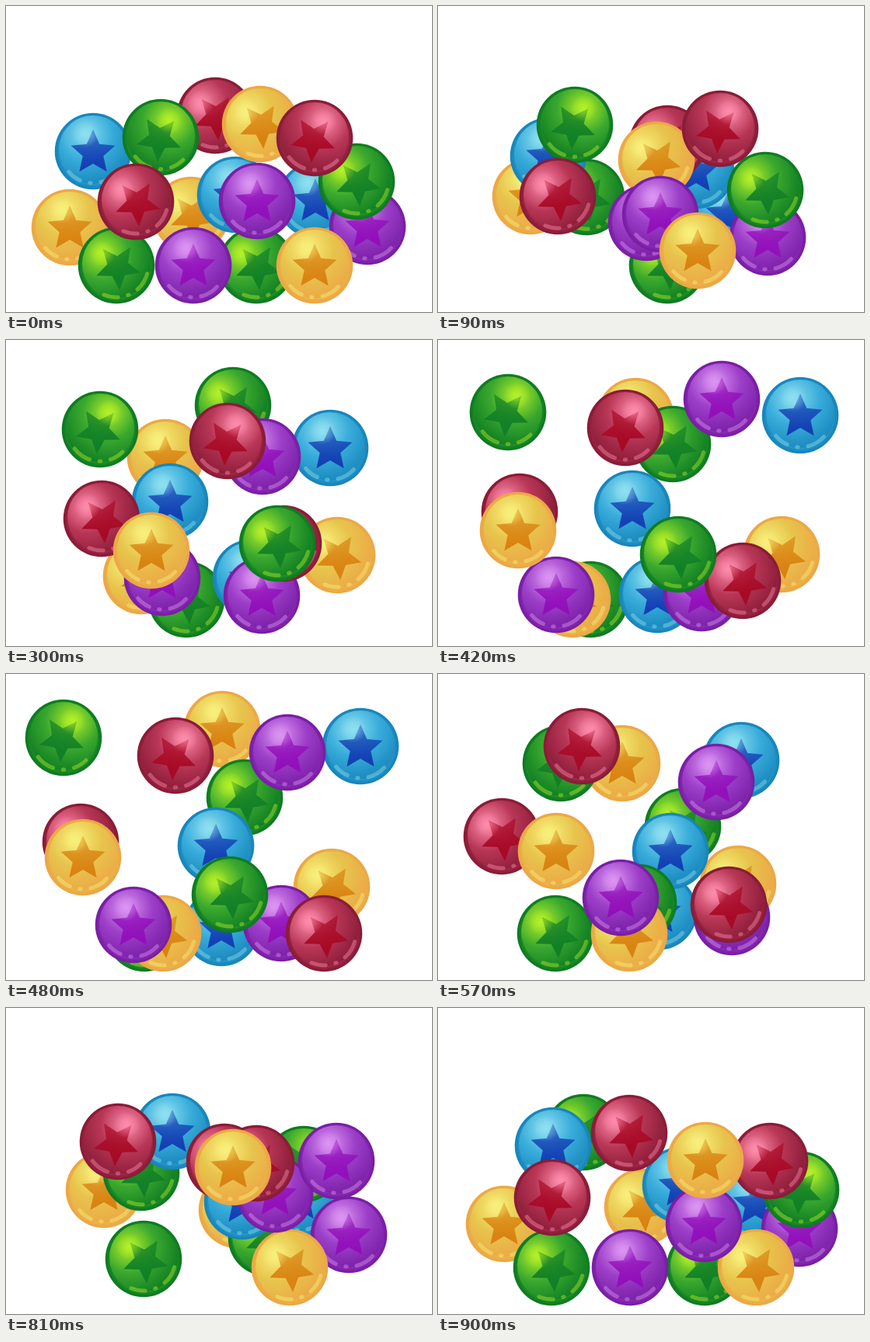
Animation, 548 px wide and 394 px high, one loop 930 ms. Source, as an HTML page with a canvas:

```html
<!DOCTYPE html>
<html lang="en">
<head>
<meta charset="utf-8">
<title>Star balls</title>
<style>
html, body { margin: 0; width: 100%; height: 100%; overflow: hidden; background: #fff; }
canvas { display: block; }
</style>
</head>
<body>
<canvas id="stage" width="548" height="394"></canvas>
<script>
const BEAT = 30, BEATS = 31, LAST = BEATS - 1;
const RADIUS = 49.3, SIZE = 102;
const FLOOR = 334, CEILING = 71;
const ctx = document.getElementById('stage').getContext('2d');
const rad = degrees => degrees * Math.PI / 180;

const palettes = {
  gold:   { glow: '#f8f07c', mid: '#e7c44c', edge: '#eca846', star: '#d98312' },
  green:  { glow: '#b4f028', mid: '#3aa82e', edge: '#0e7c22', star: '#128026' },
  blue:   { glow: '#8fe0f0', mid: '#38acda', edge: '#1886bc', star: '#1440b4' },
  purple: { glow: '#dc94f2', mid: '#9c3ec8', edge: '#7a1ea6', star: '#9210ba' },
  red:    { glow: '#ff8cac', mid: '#b83656', edge: '#8a1c38', star: '#a80a26' }
};

// Star tilt and direction of the light, in degrees.
const facings = {
  front: { tilt: 0, light: -113 },
  right: { tilt: 32, light: -140 },
  left: { tilt: -32, light: -62 }
};

const polar = (r, degrees) => [r * Math.cos(rad(degrees)), r * Math.sin(rad(degrees))];

function glowDisc(g, [x, y], r, [lx, ly], spread, stops) {
  const fill = g.createRadialGradient(lx, ly, 0, lx, ly, spread);
  stops.forEach(([at, color]) => fill.addColorStop(at, color));
  g.beginPath();
  g.arc(x, y, r, 0, Math.PI * 2);
  g.fillStyle = fill;
  g.fill();
}

function drawStar(g, color, tilt) {
  const fill = g.createLinearGradient(0, -26, 0, 28);
  fill.addColorStop(0, color + 'a0');
  fill.addColorStop(0.8, color);
  g.beginPath();
  for (let i = 0; i < 10; i++) {
    const [x, y] = polar(i % 2 ? 14 : 30, tilt - 90 + i * 36);
    g.lineTo(x + tilt / 16, y + 2);
  }
  g.fillStyle = fill;
  g.fill();
}

function drawGloss(g, color, facing) {
  const side = facing.tilt < 0 ? -1 : 1;
  const away = facing.light + 180;
  const streak = (offset, halfWidth) => {
    const center = away + side * offset;
    g.beginPath();
    g.arc(0, 0, 41, rad(center - halfWidth), rad(center + halfWidth));
    g.stroke();
  };
  g.strokeStyle = color + '70';
  g.lineWidth = 5;
  g.lineCap = 'round';
  streak(-8, 17);
  streak(28, 1);
  streak(60, 13);
}

function makeSprite(color, facingName) {
  const { glow, mid, edge, star } = palettes[color], facing = facings[facingName];
  const light = polar(24, facing.light), center = [0, 0];
  const sprite = document.createElement('canvas');
  sprite.width = sprite.height = SIZE;
  const g = sprite.getContext('2d');
  g.translate(SIZE / 2, SIZE / 2);
  glowDisc(g, center, RADIUS, center, RADIUS, [[0.75, mid], [0.95, edge]]);
  glowDisc(g, [0, -2], 44, light, 68, [[0, glow], [0.5, mid], [1, edge]]);
  drawStar(g, star, facing.tilt);
  glowDisc(g, light, 17, light, 17, [[0, glow + 'b0'], [1, glow + '00']]);
  drawGloss(g, glow, facing);
  return sprite;
}

// Each ball runs straight from start to end, turning at points [beat, x, y].
function ball(color, facing, start, end, ...turns) {
  return { sprite: makeSprite(color, facing), path: [[0, ...start], ...turns, [LAST, ...end]] };
}

// Back to front.
const balls = [
  ball('gold', 'front', [82, 285], [85, 278], [16, 278, CEILING]),
  ball('gold', 'right', [238, 269], [263, 256], [12, 464, 279]),
  ball('green', 'right', [142, FLOOR], [343, FLOOR], [9, 289, CEILING]),
  ball('green', 'right', [322, FLOOR], [187, 160], [20, 142, FLOOR]),
  ball('blue', 'front', [398, 250], [312, 228], [15, 274, FLOOR]),
  ball('blue', 'front', [295, 243], [148, 177], [15, 478, 87]),
  ball('blue', 'front', [112, 187], [408, 251]),
  ball('purple', 'front', [465, 284], [465, 284], [11, 315, FLOOR]),
  ball('red', 'right', [269, 141], [246, 161], [16, 409, FLOOR]),
  ball('green', 'right', [451, 226], [146, FLOOR]),
  ball('gold', 'right', [327, 152], [409, FLOOR], [12, 143, FLOOR]),
  ball('green', 'left', [199, 169], [467, 234], [16, 74, 82]),
  ball('purple', 'front', [241, FLOOR], [342, 278], [14, 365, 76]),
  ball('purple', 'front', [323, 251], [247, FLOOR], [15, 140, FLOOR], [29, 473, 174]),
  ball('red', 'right', [167, 252], [427, 197], [20, 78, 207]),
  ball('red', 'left', [397, 170], [147, 244], [23, 140, 77]),
  ball('gold', 'front', [397, FLOOR], [344, 196], [15, 82, 239])
];

function positionAt(path, beat) {
  const next = Math.max(1, path.findIndex(point => point[0] >= beat));
  const [b0, x0, y0] = path[next - 1], [b1, x1, y1] = path[next];
  const k = (beat - b0) / (b1 - b0);
  return [x0 + (x1 - x0) * k, y0 + (y1 - y0) * k];
}

const startTime = performance.now();
function render() {
  const beat = Math.floor((performance.now() - startTime) / BEAT) % BEATS;
  ctx.fillStyle = '#fff';
  ctx.fillRect(0, 0, 548, 394);
  for (const { sprite, path } of balls) {
    const [x, y] = positionAt(path, beat);
    ctx.drawImage(sprite, Math.round(x - SIZE / 2), Math.round(y - SIZE / 2));
  }
  requestAnimationFrame(render);
}
render();
</script>
</body>
</html>
```
